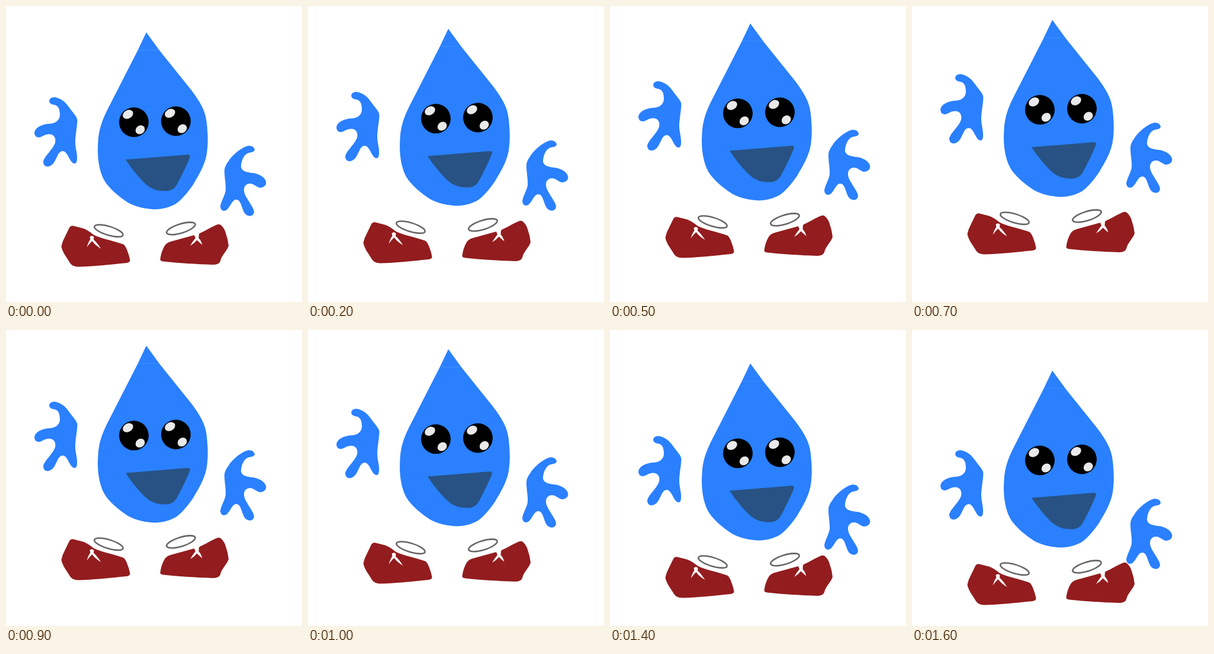
Recreate the animation shown at these times as an HTML page without scripts. Size 500 by 500 pixels, loop 1.7 s.

```html
<!DOCTYPE html>
<html lang="en">
<head>
<meta charset="utf-8">
<title>Bouncing water drop</title>
<style>
  html, body { margin: 0; width: 100%; height: 100%; overflow: hidden; background: #fff; }
  svg { display: block; width: 100%; height: 100%; }
  .water { fill: #2a80ff; }
  .shoe { fill: #931c1e; }
  .lace { fill: #fff; }
  .ring { fill: #fff; stroke: #666; stroke-width: 2.6; }
  .shine { fill: #e9e9e9; }
  .seam { stroke: #5a9dff; opacity: .5; }
  .bob { animation: bob 1.7s infinite; }
  .wave { animation: wave 1.7s infinite; }

  /* Ten pictures a second: slow rise, fast fall */
  @keyframes bob {
    0% { transform: translateY(0); animation-timing-function: steps(8); }
    47.05% { transform: translateY(-24px); animation-timing-function: steps(8); }
    94.11%, 100% { transform: translateY(24px); }
  }
  @keyframes wave {
    0% { transform: translateY(0); animation-timing-function: steps(1); }
    5.88% { transform: translateY(-3px); animation-timing-function: steps(7); }
    47.05% { transform: translateY(-45px); animation-timing-function: steps(2); }
    58.82% { transform: translateY(-21px); animation-timing-function: steps(2); }
    70.58% { transform: translateY(1px); animation-timing-function: steps(4); }
    94.11%, 100% { transform: translateY(49px); }
  }
</style>
</head>
<body>
<svg viewBox="0 0 500 500">
  <defs>
    <g id="eye">
      <circle r="25"/>
      <ellipse class="shine" rx="9.3" ry="7" transform="translate(-10 -13.3) rotate(-30)"/>
      <ellipse class="shine" rx="8.3" ry="7" transform="translate(10.7 12.8) rotate(-38)"/>
    </g>
  </defs>

  <g class="bob">
    <path class="water" d="M237 44.500 L260 76 L313 142 C328 162 337 177 339 197 C341.500 219 341.500 237 338.500 253
      C334 273 325 286 316 302 C307 315 297 327 287 334 C276 340 264 343.500 252 343.500
      C237 343 220 340 206 332 C192 323 180 313 169.500 300 C159 286 155 263 155 243
      C155.500 231 155.500 223 157.500 213 C160.500 197 168 181 176 166 L222.500 75Z"/>
    <path class="seam" d="M224 74.500 H257"/>
    <use href="#eye" x="216" y="196.300"/>
    <use href="#eye" x="287" y="194.500"/>
    <path fill="#285283" d="M202 259.500 L307 251 Q312 251 310.500 256 C305 270 297 286 290 299
      Q284 312 271 312.500 C252 313 242 307 232 297 C222 287 211 273 202 259.500Z"/>

    <path class="shoe" d="M93.500 406 Q95 398 99 391 L106.500 375.500 Q109 370.500 114 371.500 L124 374
      C135 376 141 381 148 386.500 C160 393 180 396 198 402.500 Q201 404 204 411
      Q208 421 209.500 429 Q210 433 204 434 C175 437 145 440 122 440.500
      Q112 440 108 434 C103 425 95 416 93.500 406Z"/>
    <path class="lace" d="M141.500 390 Q145 386.500 148.500 390 L148 394.500 Q154 400 160.500 410
      Q151 404.500 145.500 397 Q141 401 136.500 407.500 Q139 399 142.500 394Z"/>
    <path class="shoe" d="M260.500 428 Q262 415 268 405 Q271 400 278 398 L318 387 Q325 388 327 384
      C337 380 347 373 356 369.500 Q361 367.500 364 371 Q369 376 371 383
      Q375 394 376 405 C374 413 364 421 362 431 Q360 437 349 437
      C322 436 292 434.500 266 431.500 Q260.500 431 260.500 428Z"/>
    <path class="lace" d="M318 387 L326 385 L325.500 392 Q330 397 331.500 403.500 Q326 399 322.500 395.500
      Q318 401 311 405 Q315 398 320 392Z"/>

    <ellipse class="ring" rx="25.200" ry="7.400" transform="translate(173.500 379.700) rotate(17)"/>
    <ellipse class="ring" rx="25.200" ry="7.700" transform="translate(295.500 375.800) rotate(-17)"/>
  </g>

  <g class="wave water">
    <path d="M73 160 Q74 154 82 154 C94 156 101 163 108 173 C115 183 120.500 187 120.500 194
      C120 205 117 219 117 230 C117 240 121 250 120 260 Q119 267 115 266
      C107 264 105 246 96 245 C87 245 86 260 79 267 C73 273 64 273 63 264
      C63 255 79 243 83 231 C85 222 80 216 72 216.500 C64 217 60 222 55 222
      Q48 221 48 214 C49 205 61 200 72 199 C83 199 91 193 91 184
      C91 172 87 168 82 167 Q73 166 73 160Z"/>
    <path d="M420 242 Q418 236 410 236 C398 238 382 252 376 262 C370 270 369 274 369 280
      C369 290 372 304 371 312 C369 322 363 330 362 339 Q363 346 368 346
      C378 346 380 327 389 327 C398 327 398 346 405 352 C411 357 419 355 419 347
      C418 338 402 322 402 311 C402 304 406 300 412 300 C419 300 424 307 430 307
      Q439 306 439.500 298 C438 289 427 283 416 282 C405 281 398 278 397 272
      C397 262 402 250 410 248 C415 247 420 247 420 242Z"/>
  </g>
</svg>
</body>
</html>
```
